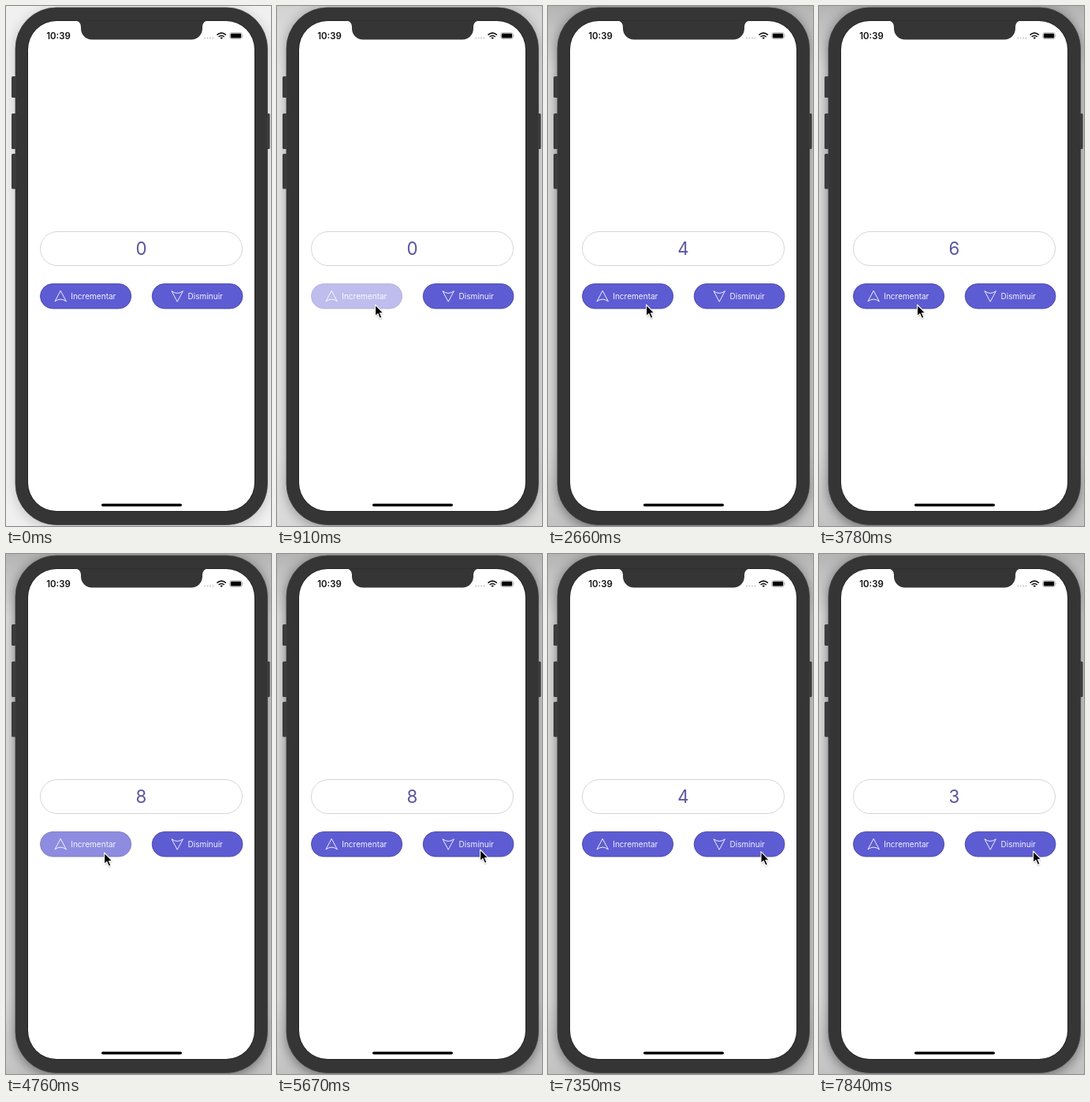
These frames come from a looping animation (336 by 658 pixels, 8000 ms). An HTML page:

```html
<!DOCTYPE html>
<html lang="es">
<head>
<meta charset="utf-8">
<title>Contador</title>
<style>
html, body { margin: 0; width: 100%; height: 100%; overflow: hidden; background: #fff; }
svg { display: block; width: 336px; height: 658px; }
text { font-family: Inter, Roboto, sans-serif; }
.label { font-size: 10.05px; fill: #f3f3ff; }
.icon { fill: none; stroke: #f0f0ff; stroke-width: 1; stroke-linejoin: round; }
.pill { fill: #5e5cd3; stroke: #4a48a6; stroke-width: .9; }
</style>
</head>
<body>
<svg viewBox="0 0 336 658">
  <defs>
    <filter id="soft" x="-20%" y="-20%" width="140%" height="140%"><feGaussianBlur stdDeviation="8"/></filter>
    <filter id="tiny" x="-50%" y="-50%" width="200%" height="200%"><feGaussianBlur stdDeviation=".9"/></filter>
    <linearGradient id="shade" x2="0" y2="1">
      <stop offset="0" stop-color="#b4b4b4"/>
      <stop offset=".12" stop-color="#dedede"/>
      <stop offset=".85" stop-color="#dedede"/>
      <stop offset="1" stop-color="#c2c2c2"/>
    </linearGradient>
    <rect id="body" x="12" y="2" width="319.5" height="654.5" rx="52"/>
    <path id="arrow" d="M0 0V14.6L3.3 11.5L5.8 17.3L8.4 16.2L5.9 10.6H10.4Z"/>
    <path id="plane" class="icon" d="M0 -6.8L7.2 6.7Q0 1.3 -7.2 6.7Z"/>
  </defs>

  <rect width="336" height="658" fill="#f0f0f0"/>
  <rect id="backdrop" width="336" height="658" fill="url(#shade)"/>
  <use id="shadow" href="#body" y="3" filter="url(#soft)"/>

  <g fill="#3b3b3b">
    <rect x="7" y="89" width="7" height="27" rx="1.5"/>
    <rect x="7" y="136" width="7" height="45" rx="1.5"/>
    <rect x="7" y="187" width="7" height="44.5" rx="1.5"/>
    <rect x="329" y="136" width="5.6" height="45" rx="1.5"/>
  </g>
  <use href="#body" fill="#353535" stroke="#424242" stroke-width=".8"/>
  <rect x="28" y="19" width="287" height="620" rx="36" fill="#fff" stroke="#1d1d1d" stroke-width="1.4" paint-order="stroke"/>
  <path d="M87 18.2Q94.5 19 95 26V28.6A14 14 0 0 0 109 42.6H235A14 14 0 0 0 249 28.6V26Q249.5 19 257 18.2Z" fill="#353535"/>

  <text x="51.2" y="41.7" font-size="11.4" font-weight="600" fill="#111">10:39</text>
  <path d="M252.2 40.6H263" stroke="#c4c4c4" stroke-width="2" stroke-linecap="round" stroke-dasharray="0 3.4"/>
  <g fill="none" stroke="#111" stroke-width="1.6">
    <path d="M267.5 36.7Q273.2 31.7 278.9 36.7"/>
    <path d="M269.6 39Q273.2 36 276.8 39"/>
  </g>
  <path d="M271.3 40.1Q273.2 38.8 275.1 40.1L273.2 42Z" fill="#111"/>
  <rect x="283.7" y="33.7" width="15.6" height="7.8" rx="2.2" fill="none" stroke="#9a9a9a" stroke-width=".7"/>
  <rect x="284.8" y="34.8" width="13.4" height="5.6" rx="1.2" fill="#000"/>
  <path d="M300.2 36.2Q301.4 37.6 300.2 39Z" fill="#9a9a9a"/>

  <rect x="43.5" y="285.5" width="256" height="43" rx="21.5" fill="#fff" stroke="#d6d6d9"/>
  <text id="count" x="171.5" y="315" font-size="22.3" text-anchor="middle" fill="#5a569f">0</text>

  <g id="inc">
    <rect class="pill" x="43.5" y="351.5" width="115.2" height="31.4" rx="15.7"/>
    <use href="#plane" x="69.2" y="367.1"/>
    <text class="label" x="82.2" y="370.6">Incrementar</text>
  </g>
  <g id="dec">
    <rect class="pill" x="185.2" y="351.5" width="114.8" height="31.4" rx="15.7"/>
    <use href="#plane" transform="translate(217.2 367.4) scale(1 -1)"/>
    <text class="label" x="230.6" y="370.6">Disminuir</text>
  </g>

  <rect x="121" y="629.8" width="102" height="3.4" rx="1.7" fill="#000"/>

  <g id="cursor">
    <use href="#arrow" y="1.2" fill="#000" opacity=".35" filter="url(#tiny)"/>
    <use href="#arrow" fill="#000" stroke="#fff" stroke-width="1.1" stroke-linejoin="round"/>
  </g>
</svg>
<script>
const LOOP = 8000, STEP = 70, FADE = 140;
const $ = id => document.getElementById(id);

// Moments when each button is pressed
const ups = [910, 1400, 1890, 2520, 3010, 3570, 4060, 4690];
const downs = [5810, 6090, 6440, 7000, 7560];

// Cursor moves along quadratic curves between its resting points
const left = [124.6, 378], right = [257.6, 374], end = [271.6, 376];
const moves = [
  { t0: 0, t1: 770, from: [336, 460], via: [200, 390], to: left },
  { t0: 5040, t1: 5670, from: left, via: [330, 334], to: right },
  { t0: 7070, t1: 7420, from: right, via: [264, 380], to: end }
];

const clamp = v => Math.max(0, Math.min(1, v));
const mix = (a, b, k) => a + (b - a) * k;
const ease = k => k * k * (3 - 2 * k);

function cursorAt(t) {
  const { t0, t1, from, via, to } = moves.findLast(m => t >= m.t0);
  const k = ease(clamp((t - t0) / (t1 - t0)));
  return from.map((a, i) => mix(mix(a, via[i], k), mix(via[i], to[i], k), k));
}

// A pressed button dims, then fades back
function drawButton(id, presses, t) {
  const last = presses.findLast(p => t >= p) ?? -FADE;
  $(id).setAttribute('opacity', mix(.4, 1, clamp((t - last) / FADE)));
}

const countUntil = (presses, t) => presses.filter(p => t >= p + STEP).length;

function draw(time) {
  const t = Math.floor((time % LOOP) / STEP) * STEP;
  $('count').textContent = countUntil(ups, t) - countUntil(downs, t);
  drawButton('inc', ups, t);
  drawButton('dec', downs, t);

  // The window gains focus with the first press
  const focus = clamp((t - ups[0] + STEP) / FADE);
  $('backdrop').setAttribute('opacity', focus);
  $('shadow').setAttribute('opacity', mix(.2, .5, focus));

  $('cursor').setAttribute('visibility', t > 0 ? 'visible' : 'hidden');
  $('cursor').setAttribute('transform', `translate(${cursorAt(t)})`);
}

const start = performance.now();
function tick() {
  draw(performance.now() - start);
  requestAnimationFrame(tick);
}
tick();
</script>
</body>
</html>
```
